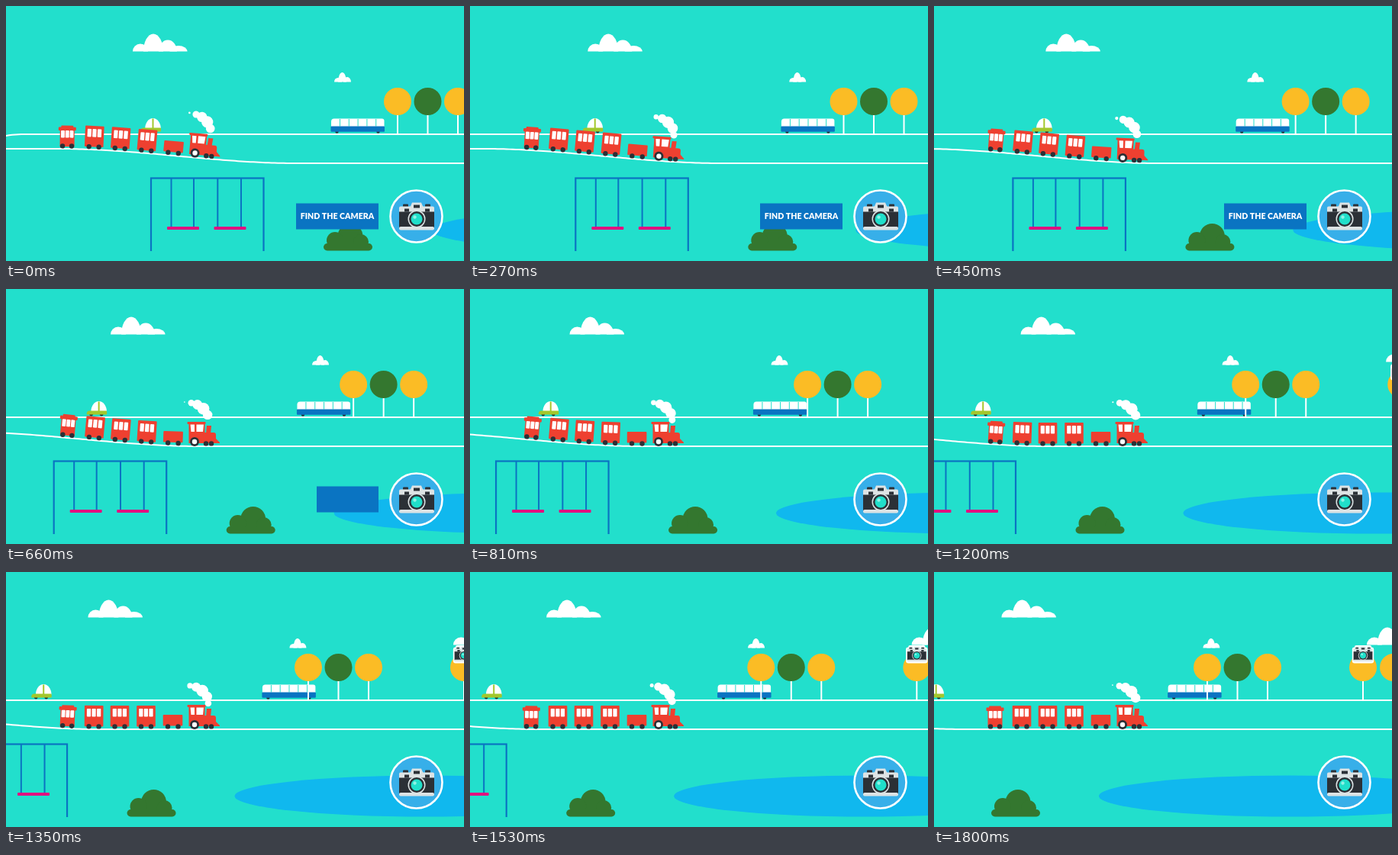
Write an HTML page with a canvas that moves like this. It is 600 by 334 pixels and loops after 1.83 s.

```html
<!DOCTYPE html>
<html lang="en">
<head>
<meta charset="utf-8">
<title>Find the camera</title>
<style>
html, body { margin: 0; height: 100%; overflow: hidden; background: #22dfcc; }
canvas { display: block; width: 600px; height: 334px; }
</style>
</head>
<body>
<canvas id="stage" width="600" height="334"></canvas>
<script>
const ctx = document.getElementById('stage').getContext('2d');
const LOOP = 1830, STEP = 30;
const SKY = '#22dfcc', RED = '#ee4030', BLUE = '#0a74c2', YELLOW = '#fbbc25',
      GREEN = '#34772f', DARK = '#2b3036', LIGHT = '#dde3e4', WHITE = '#fff';

// Linear interpolation through [position, value] pairs
function track(keys, x) {
  let i = 1;
  while (i < keys.length - 1 && x > keys[i][0]) i++;
  const [a, p] = keys[i - 1], [b, q] = keys[i];
  return p + (q - p) * (x - a) / (b - a);
}
const clamp = x => Math.min(1, Math.max(0, x));

function rect(color, x, y, w, h, r = 0) {
  ctx.fillStyle = color;
  ctx.beginPath();
  ctx.roundRect(x, y, w, h, r);
  ctx.fill();
}
function oval(color, x, y, rx, ry = rx, from = 0) {
  ctx.fillStyle = color;
  ctx.beginPath();
  ctx.ellipse(x, y, rx, ry, 0, from, Math.PI * 2);
  ctx.fill();
}
function poly(color, ...pts) {
  ctx.fillStyle = color;
  ctx.beginPath();
  for (let i = 0; i < pts.length; i += 2) ctx.lineTo(pts[i], pts[i + 1]);
  ctx.fill();
}
function at(x, y, draw, angle = 0, scale = 1) {
  ctx.save();
  ctx.translate(x, y);
  ctx.rotate(angle);
  ctx.scale(scale, scale);
  draw();
  ctx.restore();
}
function curve(f) {
  ctx.strokeStyle = WHITE;
  ctx.lineWidth = 2;
  ctx.beginPath();
  for (let x = -4; x <= 604; x += 4) ctx.lineTo(x, f(x));
  ctx.stroke();
}

// Scenery, each piece drawn from its own origin
const puffRow = bumps => bumps.forEach(([x, rx, ry]) => oval(WHITE, x, 0, rx, ry, Math.PI));
const bigCloud = () => puffRow([[10, 10, 10], [27, 13, 23], [46, 12, 15], [60, 11.5, 7.5]]);
const smallCloud = () => puffRow([[5, 5, 5.5], [10.5, 5.5, 12.5], [17, 5, 6.5]]);

function tree(x, color) {
  rect(WHITE, x - 1, 140, 2, 27);
  oval(color, x, 125, 18);
}
function bus() {
  for (const x of [8, 62]) oval(DARK, x, 164.5, 2.2);
  rect(WHITE, 0.5, 147.5, 69.5, 11, [4, 3, 0, 0]);
  for (let x = 11.5; x < 68; x += 11.8) rect(SKY, x, 148, 1, 9.5);
  rect(BLUE, 0, 157.5, 70.5, 7.3, 1);
}
function car() {
  for (const x of [6, 19.5]) oval(DARK, x, 164, 2.4);
  oval(WHITE, 16, 161, 10.3, 14, Math.PI);
  rect('#a3c72c', 15, 147.5, 2, 14);
  rect('#a3c72c', 0, 159.5, 26.5, 5, [4, 1, 1, 1]);
}
function swings() {
  ctx.strokeStyle = BLUE;
  ctx.lineWidth = 2.2;
  ctx.strokeRect(0, 225.5, 147.5, 120);
  for (const x of [26.5, 56, 87.3, 118]) rect(BLUE, x - 1, 225, 2, 65);
  for (const x of [21, 82.5]) rect('#e2107f', x, 289, 42, 4, 1);
}
function bush() {
  oval(GREEN, 3, 301.5, 16.5);
  oval(GREEN, -17, 307, 11);
  oval(GREEN, 17, 309, 10);
  rect(GREEN, -32, 311, 64, 9.5, 5);
}
function camera() {
  rect(DARK, -18, -17, 7, 5, 1);
  rect(DARK, 11, -17, 7, 5, 1);
  poly(LIGHT, -9, -12, -6, -19, 6, -19, 9, -12);
  rect(LIGHT, -23, -14, 46, 9, 2);
  rect(DARK, -4, -16, 8, 4);
  rect(DARK, -16, -11, 6, 4);
  rect(DARK, 11, -11, 6, 4);
  rect(DARK, -23, -7, 46, 21);
  rect(LIGHT, -23, 12.5, 46, 4.5, 2);
  oval(LIGHT, 0, 2.5, 11.5);
  oval(DARK, 0, 2.5, 10);
  oval('#20dfca', 0, 2.5, 7.5);
  oval('#8ff3e6', -2.5, 0, 2.2);
}
function hiddenCamera() {
  rect(WHITE, -14.2, -9.5, 28.4, 21, 3);
  rect(WHITE, -11, -12, 22, 6, 2);
  at(0, 0, camera, 0, 0.54);
}

// Rolling stock, origin on the rail
const wheels = (...xs) => xs.forEach(x => oval(DARK, x, -3.6, 3.2));
function panes(x, y, w, h, gap) {
  for (let i = 0; i < 3; i++) rect(WHITE, x + i * (w + gap), y, w, h, 0.8);
}
function caboose() {
  rect(RED, -9.5, -28, 19, 25);
  rect(RED, -11.5, -28.5, 23, 4.5, 1);
  rect(RED, -8, -30.5, 16, 3, 1);
  panes(-8.2, -24, 4.9, 9.5, 0.9);
  wheels(-6, 6);
}
function coach() {
  rect(RED, -12.3, -31, 24.6, 27.5, 1);
  panes(-9.3, -27, 5.2, 10.5, 1.4);
  wheels(-6.5, 6.5);
}
function tender() {
  rect(RED, -12.8, -19, 25.6, 14.5, 1);
  wheels(-6.5, 7);
}
function engine() {
  rect(RED, -20.5, -32, 24, 3, 1);
  rect(RED, -18.5, -30, 21, 26);
  rect(RED, 0, -18, 17, 14, 3);
  poly(RED, 4, -16, 5, -27, 11, -27, 10, -16);
  poly(RED, 15, -12, 22, -5, 22, -4, 12, -4);
  poly(WHITE, -16.5, -28.5, -11, -28.5, -11, -19, -15.5, -19);
  poly(WHITE, -8.5, -28.5, 1, -28.5, 0, -19, -8.5, -19);
  oval(DARK, -11, -6, 6);
  oval(WHITE, -11, -6, 3.2);
  wheels(4, 11);
}
function smoke(t) {
  const phase = (0.75 + t * 0.00175) % 1;
  const path = [[7, -33, 4], [6, -42, 6.5], [0, -50, 8], [-8, -55, 6.3], [-16, -57, 4], [-25, -58, 0.5]];
  for (let age = phase; age < 5; age++) {
    const [x, y, r] = [0, 1, 2].map(k => track(path.map((p, i) => [i, p[k]]), age));
    oval(WHITE, x, y, r);
  }
}

function badge() {
  oval('#37afe9', 537.5, 275.5, 34);
  ctx.strokeStyle = WHITE;
  ctx.lineWidth = 2.6;
  ctx.stroke();
  at(538, 276.5, camera);
}
function label(t) {
  const cut = 108 * clamp((t - 570) / 180) ** 2;
  if (cut >= 108) return;
  rect(BLUE, 380 + cut, 258.5, 108 - cut, 34);
  ctx.globalAlpha = clamp((600 - t) / 150);
  ctx.fillStyle = WHITE;
  ctx.font = '900 10.6px Lato, sans-serif';
  ctx.textAlign = 'center';
  ctx.fillText('FIND THE CAMERA', 434, 279);
  ctx.globalAlpha = 1;
}

const SCROLL = [[0, 0], [270, 51.7], [660, 127.3], [990, 190.3], [1200, 230.5], [1530, 289.8], [1800, 341]];
const TRAIN = [[80, caboose], [115, coach], [149, coach], [183.5, coach], [218.5, tender], [258, engine]];

function draw(t) {
  const pan = track(SCROLL, t);
  const far = pan * 0.2275, mid = pan * 0.4545, road = pan * 0.5565;
  const ease = x => clamp((x + pan - 70) / 310);
  const rail = x => { const s = ease(x); return 187 + 19 * s * s * (3 - 2 * s); };
  const tilt = x => { const s = ease(x); return Math.atan(6 * s * (1 - s) * 19 / 310); };

  rect(SKY, 0, 0, 600, 334);
  at(166 - far, 59.5, bigCloud);
  at(644.5 - far, 95.5, bigCloud);
  at(430 - far, 99.5, smallCloud);

  curve(x => 168 + 0.004 * Math.max(0, 22 - x - road) ** 2);
  at(425.5 - pan * 0.35, 0, bus);
  at(-mid, 0, () => {
    [YELLOW, GREEN, YELLOW].forEach((c, i) => tree(513 + i * 39.5, c));
    tree(717, YELLOW);
    tree(757, YELLOW);
    at(717, 108, hiddenCamera);
  });
  at(176.5 - road, 0, car);

  curve(rail);
  for (const [x, wagon] of TRAIN) at(x, rail(x), wagon, tilt(x));
  at(258, rail(258), () => smoke(t), tilt(258));

  oval('#10b8ee', 807 - pan, 293.5, 250, 27);
  at(190 - pan, 0, swings);
  at(448 - pan, 0, bush);
  rect(SKY, 0, 321, 600, 13);
  label(t);
  badge();
}

const start = performance.now();
function frame() {
  const t = (performance.now() - start) % LOOP;
  draw(Math.floor(t / STEP) * STEP);
  requestAnimationFrame(frame);
}
frame();
</script>
</body>
</html>
```
